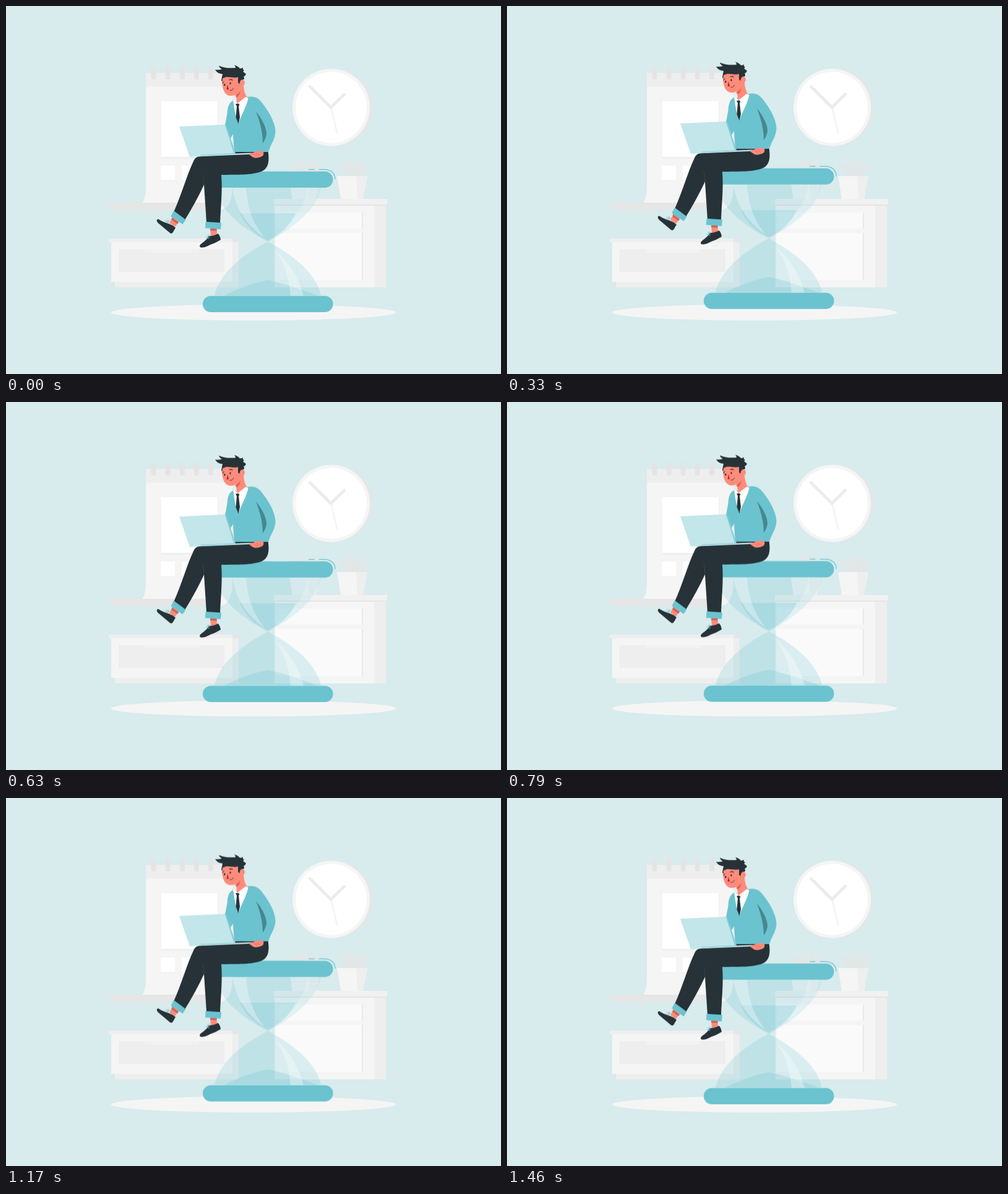
Animation of 800x595 px, one loop 1500 ms. Source, as an HTML page without scripts:

```html
<!DOCTYPE html>
<html lang="en">
<head>
<meta charset="utf-8">
<title>Working on an hourglass</title>
<style>
  html, body { margin: 0; width: 100%; height: 100%; overflow: hidden; background: #d8ebed; }
  svg { display: block; width: 100%; height: 100%; }
  .float { animation: float 1.5s linear -25ms infinite; }
  @keyframes float {
    0%, 100% { transform: translateY(.38px); }
    50% { transform: translateY(-11.3px); }
  }
  .teal { fill: #6bc3cf; }
  .dark { fill: #263238; }
  .skin { fill: #ff8b7b; }
  .white { fill: #fff; }
  .g1 { fill: #fafafa; }
  .g2 { fill: #f5f5f5; }
  .g3 { fill: #eee; }
  .g4 { fill: #e6e6e6; }
  .line { fill: none; stroke-linecap: round; stroke-linejoin: round; }
</style>
</head>
<body>
<svg viewBox="0 0 800 595">
  <defs>
    <g id="plant">
      <path d="M-10 0Q-24-12-25-21Q-13-20-6-6Q-13-20-9-30Q0-23 0-8Q2-22 12-27Q14-17 7-7Q14-18 25-18Q22-6 12 0Z"/>
    </g>
    <path id="bulb" d="M337 294H509C500 335 455 364 423 381C391 364 346 335 337 294Z"/>
  </defs>

  <ellipse class="g2" cx="400" cy="495.5" rx="230.500" ry="13"/>

  <!-- calendar -->
  <path class="g2" d="M226 108H366V290C366 314 360 328 345 330H332L220 318Q226 312 226 290Z"/>
  <path class="g3" d="M226 108H366V130.500H226Z"/>
  <path class="g4" d="M166 318H328Q332 330 346 330H178Q167 330 166 318Z"/>
  <path class="line" stroke="#e4e4e4" stroke-width="8" d="M238.500 101V115M261.700 101V115M284.800 101V115M307.800 101V115M331 101V115"/>
  <path class="g3" d="M251 154H343V246.500H251Z"/>
  <path class="white" d="M251 154H342V244H251ZM250 258H273V281H250ZM284 258H307V281H284Z"/>

  <!-- clock -->
  <circle class="g4" cx="529.500" cy="164" r="62.300"/>
  <circle class="g2" cx="525.500" cy="164" r="62.500"/>
  <circle class="white" cx="525.500" cy="164" r="57.500"/>
  <path class="line" stroke="#f3f3f3" stroke-width="2.500" d="M525.500 164L535 205"/>
  <path class="line" stroke="#ececec" stroke-width="5" d="M491.500 130.500L525 164L546.500 143"/>

  <!-- low drawer -->
  <path class="g3" d="M176 446H376V455H176Z"/>
  <path class="g2" d="M170 381H367V446H170Z"/>
  <path class="g3" d="M366 381H376V446H366ZM166 376H366V382H166ZM182 393H353V430H182Z"/>
  <path class="g4" d="M366 376H379V382H366Z"/>
  <path class="g2" d="M224 393H312V398H224Z" opacity=".6"/>

  <!-- cabinet with pots -->
  <use href="#plant" x="484" y="275" fill="#e3e6e6"/>
  <use href="#plant" x="562" y="275" fill="#e3e6e6"/>
  <path class="g2" d="M535 275H584L577 312H541ZM457 275H509L501 312H463Z"/>
  <path class="g3" d="M566 275H584L577 312H568ZM488 275H509L501 312H490Z"/>
  <path class="g2" d="M434 321H595V455H434Z"/>
  <path class="g3" d="M595 321H614V455H595Z"/>
  <path class="g4" d="M434 320H614V323H434ZM574 334H576.500V360H574ZM574 367H576.500V443H574Z"/>
  <path class="g1" d="M436 334H575V360H436ZM436 367H575V443H436Z"/>
  <path fill="#f1f1f1" d="M433 312H616V321H433Z"/>

  <g class="float">
    <!-- hourglass -->
    <g class="teal" opacity=".22">
      <use href="#bulb"/>
      <use href="#bulb" transform="matrix(1 0 0 -1 0 762)"/>
    </g>
    <path class="teal" opacity=".25" d="M378 335H468C461 352 446 369 423 379C400 369 385 352 378 335ZM352 469C372 457 403 447 423 443C443 447 474 457 506 469Z"/>
    <g class="white" opacity=".32">
      <path d="M366 294H388C390 325 398 350 418 375C387 353 371 326 366 294Z"/>
      <path d="M487 294H509C500 333 458 362 427 379C460 355 483 327 487 294Z" opacity=".55"/>
      <path d="M434 395C450 413 458 440 460 469H481C474 440 457 413 434 395Z"/>
    </g>
    <rect class="teal" x="318" y="267.600" width="210.500" height="26.200" rx="13"/>
    <rect class="teal" x="318" y="468.800" width="210.500" height="26.200" rx="13"/>
    <path class="line" stroke="#6bc3cf" stroke-width="1.300" d="M489.500 264.300H498M506 264.300H515C525 264.300 532 271 532 279.500"/>

    <!-- feet -->
    <path class="skin" d="M270 339L281 347L273 357L264 351ZM330 358H340.500L341 371L331 373Z"/>
    <path fill="#c7655b" d="M268 342L279 350L277 352.500L268 346ZM330 360H340.500V363.500L330 363Z"/>
    <path class="dark" d="M246 344.500C243 345 243 348 246 351L265 367Q268 369 270 365.500L274 358.500Q269 354 263 352Q253 349 246 344.500Z"/>
    <path class="dark" d="M314 390C311 387 316 384 320 381Q325 377 328 372Q336 372 342.500 368Q346 371 347 378Q339 383 330 386Q319 392 314 390Z"/>
    <path class="line" stroke="#6bc3cf" stroke-width="1" d="M257 348L261 350M259 346L264 349M263 346L261 351M323 374L328 376M325 371L329 374M328 370L325 376"/>

    <!-- trousers -->
    <path class="dark" d="M369 235L423.500 234C426 252 424 262 414 267C398 274 372 272.500 348 273C350 300 347 325 346 351L324 350L320 289Q307 317 289 346L271 333C283 307 292 274 303 251Q306 243.500 313 243L370 240Z"/>
    <path class="line" stroke="#465158" stroke-width=".6" d="M318 273Q320 280 320 289"/>
    <path class="teal" d="M271 331L290.500 345.500L285.500 353L266.500 340ZM322.500 348.700L348 350.500L347 361L322 359Z"/>

    <!-- torso -->
    <path class="skin" d="M372 136L384 127Q384 140 390 148L376 163L369 152Z"/>
    <path class="teal" d="M367 153C360 156 358 164 357.500 174L354 193L363 214L367 207L369 236H424C428 223 435 216 435.500 203C435 187 424 170 415 158C408 148 401 145 390 147L375 185Z"/>
    <path fill="#47878f" d="M404 171C413 181 421 196 421 207C420 214 417 219 415 222C415 206 411 188 404 171Z"/>
    <path class="white" d="M367.500 151L374.500 157L387.500 147L391.500 149C389 162 381 175 375.500 190C371 179 368 164 367.500 151Z"/>
    <path fill="#e2f1f4" d="M368 145L372 147L373 154L367 153L366 148Z"/>
    <path class="dark" d="M371 158.500L375 157.500L377.500 159.500L376 162L378 180L375.500 190.500L371.500 180L373 162Z"/>

    <!-- head -->
    <path class="skin" d="M350 113C348 126 350 140 358 144C365 147 372 144 376 138L384 129Q387 121 381 117L376 110Z"/>
    <circle class="skin" cx="381" cy="124" r="5"/>
    <path fill="#d95e53" d="M372 144Q377 141 379 137Q378 144 373 148Z"/>
    <path class="dark" d="M338 103Q344 104 349 102Q345 100 344 96.500C352 100 361 101 371 100Q371 97 369 95.500Q375 97 378 101Q381 101 383 99.500Q382 103 385 104L383 106L388 110Q387 113 384 114C386 118 385 119 382 119C379 119 378 122 377.500 126L375 124V115C369 117 361 114 355 115L350 117L349.500 123L348 120L350 110Q342 110 338 103Z"/>
    <ellipse class="dark" cx="353.300" cy="127.500" rx="1.200" ry="1.700"/>
    <ellipse class="dark" cx="362.500" cy="125" rx="1.200" ry="1.700"/>
    <path class="line" stroke="#263238" stroke-width="1.100" d="M350 125L352 122.500M361 119.500Q364 118 366 120"/>
    <path fill="#b4202a" d="M358 127L360 135H356.500Z"/>
    <path class="line" stroke="#263238" stroke-width=".9" d="M362 136.500Q366 137 367.500 133"/>

    <!-- laptop and hand -->
    <path fill="#8fd0d9" d="M354 191.700L356 192.500L371 238L369 239Z"/>
    <path fill="#c2e6ea" d="M280 195L354 191.700L369 238.500L397 237.500V239.800L297 244Z"/>
    <path class="line" stroke="#6bc3cf" stroke-width=".8" d="M315 241.300L369 238.800L354.500 192"/>
    <path class="skin" d="M392 239.500L404 235.500Q413 233.500 416 236Q418 241 412 244Q403 247 399 244.500Z"/>
    <path class="line" stroke="#c7655b" stroke-width=".7" d="M401 239L406 243M405 238.500L410 241.500"/>
  </g>
</svg>
</body>
</html>
```
